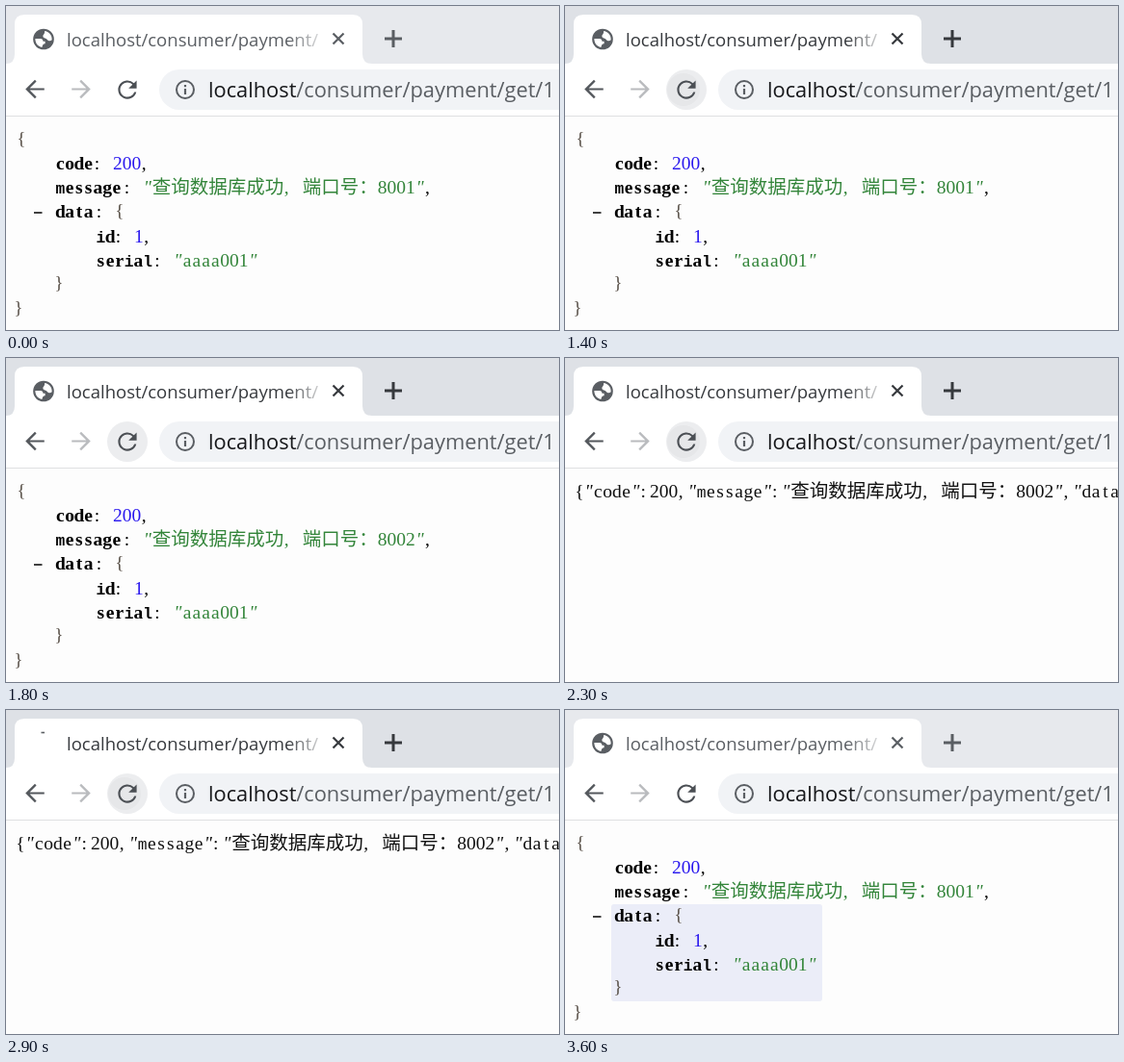
Animation of 574 by 337 pixels, one loop 3.7 s. Source, as an HTML page with a canvas:

```html
<!DOCTYPE html>
<html lang="zh">
<head>
<meta charset="utf-8">
<title>Refreshing a JSON page</title>
<style>
html, body { margin: 0; width: 100%; height: 100%; overflow: hidden; background: #fdfdfd; }
canvas { display: block; }
</style>
</head>
<body>
<canvas id="stage" width="574" height="337"></canvas>
<script>
const ctx = document.getElementById('stage').getContext('2d');
const LOOP = 3700;
const CELL = 9.75;
const UI = '"Open Sans", "Noto Sans", sans-serif';
const BLACK = '#000', GREY = '#5a5e63', GREEN = '#33853a', BLUE = '#2a18ee', BRACE = '#5a524a';

const ICONS = {
  back: new Path2D('M20 11.1H7.6l5.7-5.7L12 4l-8 8 8 8 1.3-1.4-5.7-5.7H20z'),
  reload: new Path2D('M17.65 6.35A8 8 0 1 0 19.73 14H18A6.3 6.3 0 1 1 12 5.7c1.7 0 3.2.7 4.4 1.9L13 11h7V4z'),
  seas: new Path2D('M13 4.2C17 4.6 20 8 20 12v.8C19 14 16.5 14 15.5 12.5 14.5 11 12 11.5 11.5 9.5 11 8 13.5 7 13 4.2z' +
    'M4 11.5h5c2 0 2.5 1.5 2.5 2.5h2v2.5c-2 0-2.5 1.5-3 3.3C6.5 19 4 15.8 4 11.5z')
};

// Each step overrides part of the state from its time onwards.
const STEPS = [
  [0, { active: false, hover: 'none', icon: 'globe', raw: false, port: 8001, mark: false }],
  [300, { hover: 'start' }],
  [500, { hover: 'light' }],
  [600, { active: true }],
  [700, { hover: 'press' }],
  [1000, { port: 8002 }],
  [1400, { port: 8001, hover: 'ripple' }],
  [1700, { raw: true, port: 8002 }],
  [1800, { raw: false, hover: 'light' }],
  [1900, { hover: 'ripple' }],
  [2000, { raw: true, port: 8001 }],
  [2100, { raw: false, hover: 'light' }],
  [2300, { raw: true, port: 8002, hover: 'ripple' }],
  [2400, { raw: false, hover: 'light' }],
  [2500, { icon: 'none' }],
  [2600, { raw: true, port: 8001, hover: 'ripple' }],
  [2700, { raw: false, icon: 'globe' }],
  [2800, { hover: 'light' }],
  [2900, { raw: true, port: 8002, icon: 'spin', hover: 'ripple' }],
  [3000, { raw: false, icon: 'globe', hover: 'light' }],
  [3100, { port: 8001 }],
  [3300, { hover: 'none' }],
  [3400, { mark: true }],
  [3500, { active: false }]
];

function stateAt(t) {
  return Object.assign({}, ...STEPS.filter(s => s[0] <= t).map(s => s[1]));
}

function disc(x, y, r, color) {
  ctx.fillStyle = color;
  ctx.beginPath();
  ctx.arc(x, y, r, 0, 7);
  ctx.fill();
}

function box(x, y, w, h, r, color) {
  ctx.fillStyle = color;
  ctx.beginPath();
  ctx.roundRect(x, y, w, h, r);
  ctx.fill();
}

function lines(color, width, ...segments) {
  ctx.strokeStyle = color;
  ctx.lineWidth = width;
  ctx.beginPath();
  for (const [x1, y1, x2, y2] of segments) {
    ctx.moveTo(x1, y1);
    ctx.lineTo(x2, y2);
  }
  ctx.stroke();
}

// Icons use a 24 unit box centred on (x, y).
function icon(path, x, y, sx, color, sy = sx) {
  ctx.save();
  ctx.translate(x, y);
  ctx.scale(sx, sy);
  ctx.translate(-12, -12);
  ctx.fillStyle = color;
  ctx.fill(path);
  ctx.restore();
}

function label(text, x, y, size, color) {
  ctx.font = `${size}px ${UI}`;
  ctx.textAlign = 'left';
  ctx.fillStyle = color;
  ctx.fillText(text, x, y);
  return x + ctx.measureText(text).width;
}

function codeFont(ch, bold) {
  const weight = bold ? 'bold ' : '';
  if (ch > '\u2fff') return '300 19.5px "Noto Sans CJK SC", "Noto Sans CJK", sans-serif';
  if ('mil'.includes(ch)) return weight + '16.25px "Liberation Mono", monospace';
  return (ch === '"' ? 'italic ' : weight) + '19.5px "Liberation Serif", serif';
}

// Half and full width characters on a fixed grid; returns the end.
function code(text, x, y, color, bold = false) {
  ctx.fillStyle = color;
  ctx.textAlign = 'center';
  for (const ch of text) {
    const w = ch > '\u2fff' ? CELL * 2 : CELL;
    const shift = ':,'.includes(ch) ? -2 : 0;
    ctx.font = codeFont(ch, bold);
    ctx.fillText(ch, x + w / 2 + shift, y);
    x += w;
  }
  return x;
}

function tabStrip(s) {
  const ink = s.active ? '#36393d' : GREY;
  ctx.fillStyle = s.active ? '#dee1e6' : '#e7e9ed';
  ctx.fillRect(0, 0, 574, 60);
  ctx.fillStyle = '#fff';
  ctx.fillRect(0, 60, 574, 54);
  ctx.beginPath();
  ctx.moveTo(0, 60);
  ctx.quadraticCurveTo(9, 60, 9, 50);
  ctx.lineTo(9, 19);
  ctx.quadraticCurveTo(9, 9, 19, 9);
  ctx.lineTo(360, 9);
  ctx.quadraticCurveTo(370, 9, 370, 19);
  ctx.lineTo(370, 50);
  ctx.quadraticCurveTo(370, 60, 380, 60);
  ctx.fill();

  if (s.icon === 'globe') {
    disc(39, 34.5, 10.8, GREY);
    icon(ICONS.seas, 39, 34.5, 1.08, '#fff');
  }
  if (s.icon === 'spin') lines(GREY, 1.6, [36.5, 23.5, 40, 23.5]);

  const fade = ctx.createLinearGradient(292, 0, 327, 0);
  fade.addColorStop(0, ink);
  fade.addColorStop(1, ink + '30');
  label('localhost/consumer/payment/', 63, 42, 18.5, fade);
  lines(ink, 2.2, [339.5, 28.5, 350.5, 39.5], [350.5, 28.5, 339.5, 39.5]);
  lines(ink, 3, [393, 34, 411, 34], [402, 25, 402, 43]);
}

function reloadHover(kind) {
  const x = 126, y = 87;
  if (kind === 'start') disc(x, y, 10, '#f6f6f7');
  if (kind === 'light') disc(x, y, 21, '#ecedef');
  if (kind === 'press') disc(x, y, 21, '#dfe0e2');
  if (kind === 'ripple') {
    disc(x, y, 21, '#ecedef');
    disc(x - 3, y, 17, '#e6e7e9');
  }
}

function toolbar(s) {
  icon(ICONS.back, 30, 86.5, 1.22, '#54585d');
  icon(ICONS.back, 78, 86.5, -1.22, '#b9bbbe', 1.22);
  reloadHover(s.hover);
  icon(ICONS.reload, 126, 87, 1.2, '#4b4f54');

  box(159, 66, 460, 42, 21, '#f1f3f6');
  ctx.strokeStyle = GREY;
  ctx.lineWidth = 2;
  ctx.beginPath();
  ctx.arc(186, 87, 9, 0, 7);
  ctx.stroke();
  lines(GREY, 2.2, [186, 86, 186, 92], [186, 82, 186, 84.2]);

  const end = label('localhost', 210, 95, 21.8, '#17181b');
  label('/consumer/payment/get/1', end, 95, 21.8, GREY);
  ctx.fillStyle = '#dfe0e2';
  ctx.fillRect(0, 114, 574, 1);
}

function rowY(row) {
  return 145 + row * 25.15;
}

function brace(ch, x, row) {
  code(ch, x, rowY(row) - 1.5, BRACE);
}

function field(key, x, row, valueX) {
  code(key, x, rowY(row), BLACK, true);
  // Bold keys run a hair wider than the grid.
  code(':', valueX - CELL * 2, rowY(row), BLACK);
}

function entry(key, x, row, valueX, value, color, tail = '') {
  field(key, x, row, valueX);
  const end = code(value, valueX, rowY(row), color);
  code(tail, end, rowY(row), BLACK);
}

function page(s) {
  const message = `"查询数据库成功, 端口号：${s.port}"`;
  if (s.raw) {
    code(`{"code":200,"message":${message},"data":`, 10, rowY(0), '#111');
    return;
  }
  if (s.mark) box(48, 202, 219, 101, 3, '#ebedf8');
  brace('{', 11, 0);
  entry('code', 51.5, 1, 111, '200', BLUE, ',');
  entry('message', 51.5, 2, 142, message, GREEN, ',');
  lines(BLACK, 1.5, [29, 215, 37.5, 215]);
  field('data', 51.5, 3, 113);
  brace('{', 113, 3);
  entry('id', 93.5, 4, 133, '1', BLUE, ',');
  entry('serial', 93.5, 5, 173.5, '"aaaa001"', GREEN);
  brace('}', 50, 6);
  brace('}', 8, 7);
}

function draw(now) {
  const s = stateAt(now % LOOP);
  ctx.fillStyle = '#fdfdfd';
  ctx.fillRect(0, 0, 574, 337);
  tabStrip(s);
  toolbar(s);
  page(s);
}

const begin = performance.now();
function tick() {
  draw(performance.now() - begin);
  requestAnimationFrame(tick);
}
tick();
</script>
</body>
</html>
```
